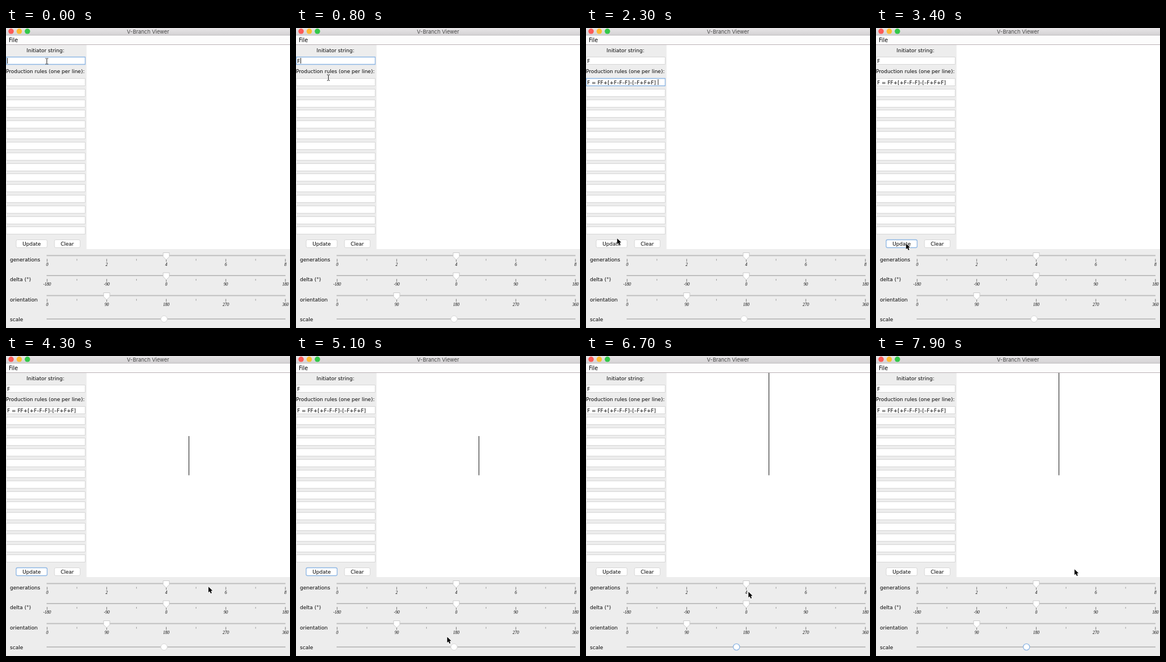
Write an HTML page with a canvas that moves like this. It is 504 px wide and 532 px high and loops after 8000 ms.

```html
<!DOCTYPE html>
<html>
<head>
<meta charset="utf-8">
<style>
html, body { margin: 0; width: 504px; height: 532px; overflow: hidden; background: #ededed; }
canvas { display: block; }
</style>
</head>
<body>
<canvas id="stage" width="504" height="532"></canvas>
<script>
const c = document.getElementById('stage').getContext('2d');
const SANS = '9px "DejaVu Sans", sans-serif';
const MARK = 'italic 7.5px "Liberation Serif", serif';
const BLUE = '#8db6e4', GREY = '#d6d6d6';
const RULE = 'F = FF+[+F–F–F]–[–F+F+F]';
const ARROW = new Path2D('M0 0V10L2.3 8L4 11.8L5.8 11L4.2 7.3L7.2 7Z');
const THUMB = new Path2D('M-5.5 -5H5.5V2L0 7.5L-5.5 2Z');

// Pointer moves: start, end, x, y
const moves = [
  [500, 900, 52, 97], [1400, 1900, 68, 374], [2100, 2300, 55, 373], [2800, 3100, 53, 382],
  [3650, 3900, 393, 376], [4000, 5100, 268, 498], [5100, 5300, 281, 514],
  [5300, 5500, 267, 514], [5500, 6400, 292, 398], [6400, 6700, 288, 418], [7000, 7900, 352, 378]
];

const progress = (t, from, to) => Math.min(1, Math.max(0, (t - from) / (to - from)));

function pointerAt(t) {
  let x = 72, y = 59;
  for (const [from, to, toX, toY] of moves) {
    const k = progress(t, from, to);
    x += (toX - x) * k;
    y += (toY - y) * k;
  }
  return [Math.round(x), Math.round(y)];
}

function rect(x, y, w, h, fill) {
  c.fillStyle = fill;
  c.fillRect(x, y, w, h);
}

function text(s, x, y, align = 'left', font = SANS, fill = '#000') {
  c.font = font;
  c.textAlign = align;
  c.fillStyle = fill;
  c.fillText(s, x, y);
}

function box(x, y, w, h, radius, focused) {
  c.beginPath();
  c.roundRect(x, y, w, h, radius);
  outline(focused);
}

function outline(focused) {
  c.fillStyle = '#fff';
  c.fill();
  c.lineWidth = focused ? 1.3 : 1;
  c.strokeStyle = focused ? BLUE : GREY;
  c.stroke();
}

function disc(x, y, r) {
  c.beginPath();
  c.arc(x, y, r, 0, 2 * Math.PI);
}

function field(y, focused) {
  box(.5, y - 6.5, 140, 13, 0, focused);
}

function button(label, x, w, focused) {
  box(x, 375.5, w, 14, 2.5, focused);
  text(label, x + w / 2, 385.7, 'center');
}

function track(label, y, labelY) {
  text(label, 7, labelY);
  rect(72, y - 1, 424, 2, '#bfbfbf');
}

function slider(label, y, min, max, value) {
  track(label, y, y + 10);
  for (let i = 0; i <= 8; i++) {
    const x = 73 + i * 52.85;
    rect(x - .5, y + 6, 1, i % 2 ? 3 : 5, i % 2 ? '#999' : '#777');
    if (i % 2 === 0) text(min + (max - min) * i / 8, x, y + 18, 'center', MARK);
  }
  c.save();
  c.translate(73 + 422.8 * progress(value, min, max), y);
  c.fillStyle = '#fff';
  c.fill(THUMB);
  c.lineWidth = 1;
  c.strokeStyle = '#cacaca';
  c.stroke(THUMB);
  c.restore();
}

function drawPointer(x, y) {
  if (y < 364 && x < 95) {
    rect(x, y - 4.5, 1, 9, '#222');
    for (const end of [-5.5, 4.5])
      for (const side of [-2, 1]) rect(x + side, y + end, 2, 1, '#222');
    return;
  }
  c.save();
  c.translate(x + .3, y + .2);
  c.lineJoin = 'round';
  c.lineWidth = 1.4;
  c.strokeStyle = '#fff';
  c.stroke(ARROW);
  c.fillStyle = '#000';
  c.fill(ARROW);
  c.restore();
}

function drawWindow() {
  rect(0, 0, 504, 532, '#ededed');
  const bar = c.createLinearGradient(0, 0, 0, 13);
  bar.addColorStop(0, '#e8e6e8');
  bar.addColorStop(1, '#d3d1d3');
  rect(0, 0, 504, 13, bar);
  rect(0, 12.5, 504, 1, '#bcb8bc');
  ['#fc5b57', '#fdbc30', '#34c84a'].forEach((fill, i) => {
    disc(9 + i * 14.5, 5.8, 4.8);
    c.fillStyle = fill;
    c.fill();
  });
  text('V-Branch Viewer', 252, 9.5, 'center', '9.4px Inter, sans-serif', '#444');
  rect(0, 13.5, 504, 15.5, '#fcfcfc');
  text('File', 5, 25, 'left', '9.7px "DejaVu Sans", sans-serif');
  rect(0, 29, 504, 1, '#b9b1b4');
  rect(143, 30, 361, 362, '#fff');
  text('Initiator string:', 70, 43, 'center');
  text('Production rules (one per line):', 0, 80);
}

function draw(t) {
  const focus = t < 900 ? 'start' : t < 3100 ? 'rule' : t < 5300 ? 'update' : 'scale';
  const drag = progress(t, 5300, 5500);
  const pasted = t >= 1100;

  drawWindow();
  field(58, focus === 'start');
  for (let i = 0; i < 15; i++) field(Math.round(96 + i * 18.82), i === 0 && focus === 'rule');
  if (t >= 300) text('F', 2, 61.5);
  if (pasted) text(RULE, 2, 99.5);

  // Text caret, blinking after the paste
  if (focus === 'start') rect(t < 300 ? 2 : 8, 53, 1, 10, '#222');
  if (focus === 'rule' && (!pasted || (t - 1100) % 1000 < 500))
    rect(pasted ? 127.5 : 2, 91, 1, 10, '#222');

  button('Update', 18, 55, focus === 'update');
  button('Clear', 86, 45.5, false);

  if (t >= 3500) {
    const top = Math.max(30, 211.5 - 69.5 * Math.exp(1.2 * drag));
    rect(324, top, 1.2, 211.5 - top, '#333');
  }

  slider('generations', 403.5, 0, 8, 4);
  slider('delta (°)', 439, -180, 180, 0);
  slider('orientation', 474.5, 0, 360, 90);
  track('scale', 516, 519.5);
  disc(280.5 - 13.5 * drag, 516, 5.7);
  outline(focus === 'scale');

  drawPointer(...pointerAt(t));
}

// The picture advances ten times a second
const start = performance.now();
function tick() {
  const t = (performance.now() - start) % 8000;
  draw(Math.floor(t / 100) * 100);
  requestAnimationFrame(tick);
}
tick();
</script>
</body>
</html>
```
